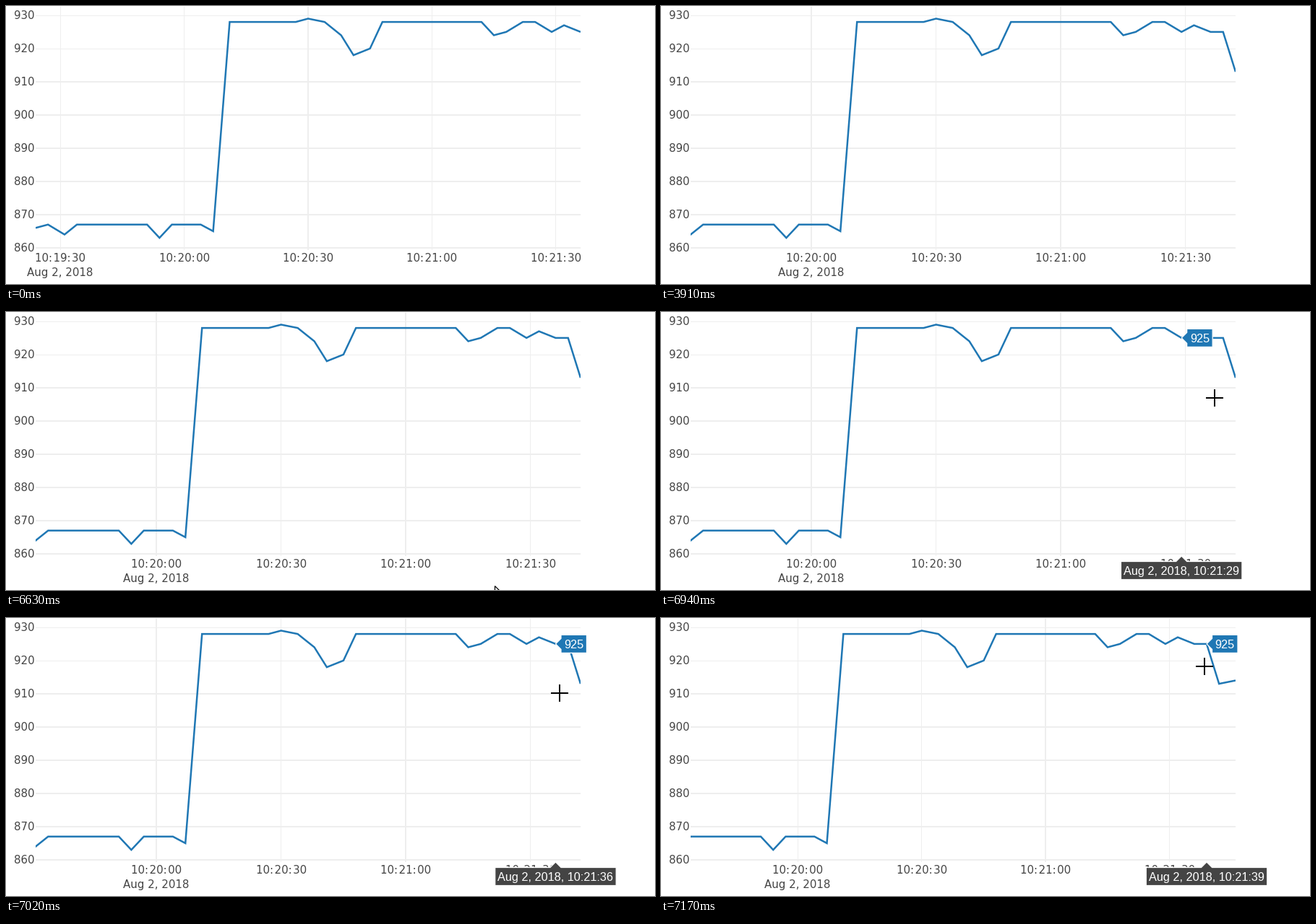
Write a matplotlib script that moves like this. It is 898 px wide and 385 px high and loops after 8 s.

```python
import math

import matplotlib.pyplot as plt
import numpy as np
from matplotlib.animation import FuncAnimation
from matplotlib.patches import Polygon, Rectangle

W, H, DPI = 898, 385, 64
LOOP, STEP = 8000, 20
LEFT, RIGHT, TOP, BOTTOM = 41, 795, 1, 338
ZOOM = 1.25
BLUE, DARK, GRID = "#1f77b4", "#444444", "#eeeeee"


def burst(start, period, count):
    """Whole seconds at which a steady poll reports."""
    return np.floor(start + period * np.arange(count)).astype(int)


# seconds after 10:20:00; the level jumps once, with a few small excursions
SECONDS = np.concatenate([burst(-35.6, 3.35, 15), burst(27.4, 3.55, 7),
                          burst(72.1, 3.42, 11)])
JUMP = 11
EXCURSION = {-36: -1, -29: -3, -6: -4, 7: -2, 30: 1, 38: -4, 41: -10, 45: -8,
             75: -4, 78: -3, 89: -3, 92: -1, 96: -3, 99: -3, 102: -15,
             106: -14}
VALUES = np.array([(867 if s < JUMP else 928) + EXCURSION.get(s, 0)
                   for s in SECONDS.tolist()])

# each arrival scrolls the window on by one sample
ARRIVALS = (0, 500, 3910, 7170)

MOVE_START, MOVE_END, MOVES = 6630, 7170, 7
PATH_STEP = (0, 3, 4, 6, 7)
PATH_X = (676, 724, 766, 766, 752)
PATH_Y = (379, 190, 119, 88, 67)


def px(size):
    """Pixels to points."""
    return size * 72 / DPI


def y_of(value):
    return 12.9 + (930 - value) * 4.6


def clock(second):
    total = 10 * 3600 + 20 * 60 + second
    return f"{total // 3600:02d}:{total // 60 % 60:02d}:{total % 60:02d}"


def pointer(step):
    return (np.interp(step, PATH_STEP, PATH_X),
            np.interp(step, PATH_STEP, PATH_Y))


fig = plt.figure(figsize=(W / DPI, H / DPI), dpi=DPI, facecolor="white")
ax = fig.add_axes([0, 0, 1, 1])
ax.set(xlim=(0, W), ylim=(H, 0))
ax.axis("off")


def label(text="", x=0, y=0, ha="center", size=12 * ZOOM, color=DARK,
          family="DejaVu Sans", z=3):
    return ax.text(x, y, text, ha=ha, va="baseline", fontsize=px(size),
                   color=color, family=family, zorder=z)


def bar(x, y, w, h, color, z):
    return ax.add_patch(Rectangle((x, y), w, h, fc=color, lw=0, zorder=z,
                                  antialiased=False))


def shape(fill, edge, z):
    return ax.add_patch(Polygon([(0, 0)] * 3, closed=True, fc=fill, ec=edge,
                                lw=px(ZOOM), joinstyle="miter", zorder=z))


def tag_text(ha):
    return label(ha=ha, size=13 * ZOOM, color="white",
                 family="Liberation Sans", z=6)


# fixed horizontal grid and value labels
for value in range(860, 940, 10):
    y = y_of(value)
    wide = value < 920
    bar(LEFT, round(y) - wide, RIGHT - LEFT, 1 + wide, GRID, 1)
    label(str(value), 40, y + 5.5, ha="right")

# moving parts
columns = [bar(0, TOP, 1, BOTTOM - TOP, GRID, 1) for _ in range(5)]
times = [label() for _ in range(5)]
date = label("Aug 2, 2018", y=374.3)

curve, = ax.plot([], [], color=BLUE, lw=px(2 * ZOOM),
                 solid_joinstyle="miter", solid_capstyle="butt", zorder=2)
curve.set_clip_path(Rectangle((LEFT, TOP), RIGHT - LEFT, BOTTOM - TOP,
                              transform=ax.transData))

value_tag, value_text = shape(BLUE, "white", 5), tag_text("left")
time_tag, time_text = shape(DARK, "white", 5), tag_text("center")
hover_parts = (value_tag, value_text, time_tag, time_text)

arrow = shape("white", "black", 8)
cross = [bar(0, 0, 24, 2, "black", 8), bar(0, 0, 2, 24, "black", 8)]


def place_view(view):
    """Lay out the window and return the x of every sample."""
    first, last = int(SECONDS[view]), int(SECONDS[view - len(ARRIVALS)])

    def x_of(second):
        return LEFT + (second - first) * (RIGHT - LEFT) / (last - first)

    ticks = range(math.ceil(first / 30) * 30, last + 1, 30)
    for part in columns + times:
        part.set_visible(False)
    for tick, column, text in zip(ticks, columns, times):
        x = x_of(tick)
        # a zoomed hairline straddles two pixels once in four positions
        wide = 1.7 <= x / ZOOM % 4 < 2.7
        column.set_x(round(x) - 1 if wide else math.floor(x))
        column.set_width(1 + wide)
        column.set_visible(True)
        # hair spaces give the colons a little air
        text.set_text(clock(tick).replace(":", ":\u200a"))
        text.set_position((x, 354.5))
        text.set_visible(True)
    date.set_x(x_of(ticks[0]) - 0.5)

    xs = x_of(SECONDS)
    shown = SECONDS <= last
    curve.set_data(xs[shown], y_of(VALUES[shown]))
    return xs


def place_hover(step, xs):
    # the hover trails a moving pointer by one step
    seen_x, seen_y = pointer(step if step == MOVES else step - 1)
    shown = step > 0 and seen_y < BOTTOM
    for part in hover_parts:
        part.set_visible(shown)
    if not shown:
        return
    near = int(np.argmin(abs(xs - seen_x)))
    x, y = xs[near], y_of(VALUES[near])
    tip, half = 6 * ZOOM, 10 * ZOOM
    value_tag.set_xy([(x, y), (x + tip, y + tip), (x + tip, y + half),
                      (x + 43, y + half), (x + 43, y - half),
                      (x + tip, y - half), (x + tip, y - tip)])
    value_text.set_text(str(VALUES[near]))
    value_text.set_position((x + 11.7, y + 5.9))

    top, low, side = BOTTOM + tip, BOTTOM + tip + 2 * half, 83.75
    time_tag.set_xy([(x, BOTTOM), (x + tip, top), (x + side, top),
                     (x + side, low), (x - side, low), (x - side, top),
                     (x - tip, top)])
    time_text.set_text(f"Aug 2, 2018, {clock(int(SECONDS[near]))}")
    time_text.set_position((x, 364))


def place_pointer(step):
    x, y = pointer(step)
    inside = y < BOTTOM
    arrow.set_visible(step >= 0 and not inside)
    for part in cross:
        part.set_visible(step >= 0 and inside)
    arrow.set_xy([(x + 0.5, y + 0.5), (x + 0.5, y + 17), (x + 4.5, y + 13),
                  (x + 12, y + 12)])
    cross[0].set_xy((x - 12, y - 1))
    cross[1].set_xy((x - 1, y - 12))


def update(i):
    ms = i * STEP + STEP // 2
    view = sum(ms >= t for t in ARRIVALS) - 1
    step = min((ms - MOVE_START) * MOVES // (MOVE_END - MOVE_START), MOVES)
    place_hover(step, place_view(view))
    place_pointer(step)
    return []


anim = FuncAnimation(fig, update, frames=LOOP // STEP, interval=STEP,
                     init_func=lambda: update(0), repeat=True,
                     repeat_delay=0, blit=False)
plt.show()
```
